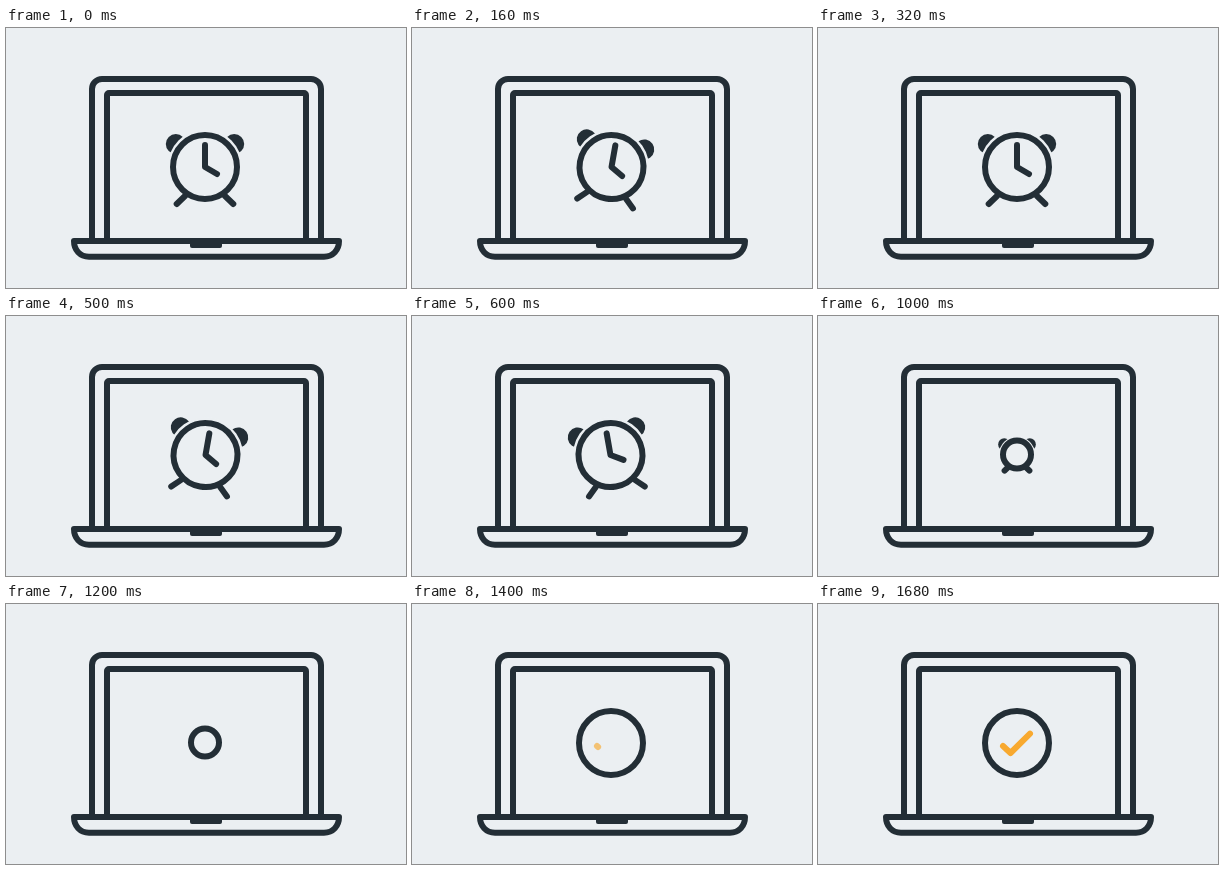
Recreate the animation shown at these times as an HTML page with a canvas. Size 400x260 px, loop 2680 ms.

```html
<!DOCTYPE html>
<html lang="en">
<head>
<meta charset="utf-8">
<title>Alarm done</title>
<style>
html, body { margin: 0; width: 100%; height: 100%; overflow: hidden; background: #ebeff2; }
canvas { display: block; width: 400px; height: 260px; }
</style>
</head>
<body>
<canvas id="stage" width="400" height="260"></canvas>
<script>
const ctx = document.getElementById('stage').getContext('2d');
const BG = '#ebeff2', INK = '#232e36', ACCENT = '#f8a92f';
const LOOP = 2680, CX = 199, RADIUS = 32, PIVOT_Y = 142;

function line(points, color = INK) {
  ctx.strokeStyle = color;
  ctx.beginPath();
  points.forEach(([x, y]) => ctx.lineTo(x, y));
  ctx.stroke();
}

function disc(x, y, r, color) {
  ctx.fillStyle = color;
  ctx.beginPath();
  ctx.arc(x, y, r, 0, Math.PI * 2);
  ctx.fill();
}

function ring(y, r) {
  ctx.strokeStyle = INK;
  ctx.beginPath();
  ctx.arc(CX, y, r, 0, Math.PI * 2);
  ctx.stroke();
}

function lid(left, right, top, r) {
  ctx.beginPath();
  ctx.moveTo(left, 213);
  ctx.arcTo(left, top, right, top, r);
  ctx.arcTo(right, top, right, 213, r);
  ctx.lineTo(right, 213);
  ctx.stroke();
}

function laptop() {
  ctx.strokeStyle = INK;
  lid(86, 315, 51, 10);
  lid(101, 300, 65, 2);
  ctx.fillStyle = BG;
  ctx.beginPath();
  ctx.moveTo(68, 213);
  ctx.lineTo(333, 213);
  ctx.bezierCurveTo(333, 222, 327, 228.7, 318, 228.7);
  ctx.lineTo(83, 228.7);
  ctx.bezierCurveTo(74, 228.7, 68, 222, 68, 213);
  ctx.closePath();
  ctx.fill();
  ctx.stroke();
  ctx.fillStyle = INK;
  ctx.beginPath();
  ctx.roundRect(184, 212, 32, 8, 2);
  ctx.fill();
}

// Sizes scale with s while the line weight stays constant.
function clock(s, angle, handAlpha) {
  const cy = 138 + s, r = RADIUS * s;
  const at = (x, y) => [CX + x * s, cy + y * s];
  ctx.save();
  ctx.translate(CX, PIVOT_Y);
  ctx.rotate(angle * Math.PI / 180);
  ctx.translate(-CX, -PIVOT_Y);
  for (const side of [-1, 1]) disc(...at(side * 29.2, -23), 3 + 7 * s, INK);
  disc(CX, cy, r + 3 + 2.5 * s, BG);
  for (const side of [-1, 1]) line([at(side * 20, 29), at(side * 28.3, 37)]);
  disc(CX, cy, r, BG);
  ring(cy, r);
  ctx.globalAlpha = handAlpha;
  line([at(0, -22), at(0, 0), at(12, 7)]);
  ctx.restore();
}

function check(progress, alpha) {
  const a = [185, 142], b = [192.5, 149], c = [212, 129.7];
  const first = Math.hypot(b[0] - a[0], b[1] - a[1]);
  const second = Math.hypot(c[0] - b[0], c[1] - b[1]);
  const len = progress * (first + second);
  const mix = (p, q, k) => [p[0] + (q[0] - p[0]) * k, p[1] + (q[1] - p[1]) * k];
  const points = [a, mix(a, b, Math.min(1, len / first))];
  if (len > first) points.push(mix(b, c, (len - first) / second));
  ctx.globalAlpha = alpha;
  line(points, ACCENT);
  ctx.globalAlpha = 1;
}

// The motion is held in steps: 80 ms, then 100 ms, then 70 ms.
function stepAt(t) {
  if (t < 400) return Math.floor(t / 80);
  if (t < 1400) return 5 + Math.floor((t - 400) / 100);
  return Math.min(19, 15 + Math.floor((t - 1400) / 70));
}

function draw(t) {
  const step = stepAt(t);
  ctx.fillStyle = BG;
  ctx.fillRect(0, 0, 400, 260);
  ctx.lineWidth = 6;
  ctx.lineCap = ctx.lineJoin = 'round';
  laptop();

  if (step < 9) {
    const angle = step % 4 === 0 && step < 8 ? 0 : step % 2 ? -10 : 10;
    clock(1, angle, 1);
    return;
  }
  // Shrinks for three steps, then grows back as an empty ring.
  const r = step < 15 ? 5 + 9 * Math.abs(step - 12) : RADIUS;
  const s = r / RADIUS;
  if (step < 12) {
    clock(s, 0, Math.max(0, 1 - (step - 9) / 2));
  } else {
    ring(138 + s, r);
  }
  if (step >= 15) {
    check(0.04 + 0.96 * (step - 15) / 4, step === 15 ? 0.65 : 1);
  }
}

const start = performance.now();
function tick() {
  draw((performance.now() - start) % LOOP);
  requestAnimationFrame(tick);
}
tick();
</script>
</body>
</html>
```
